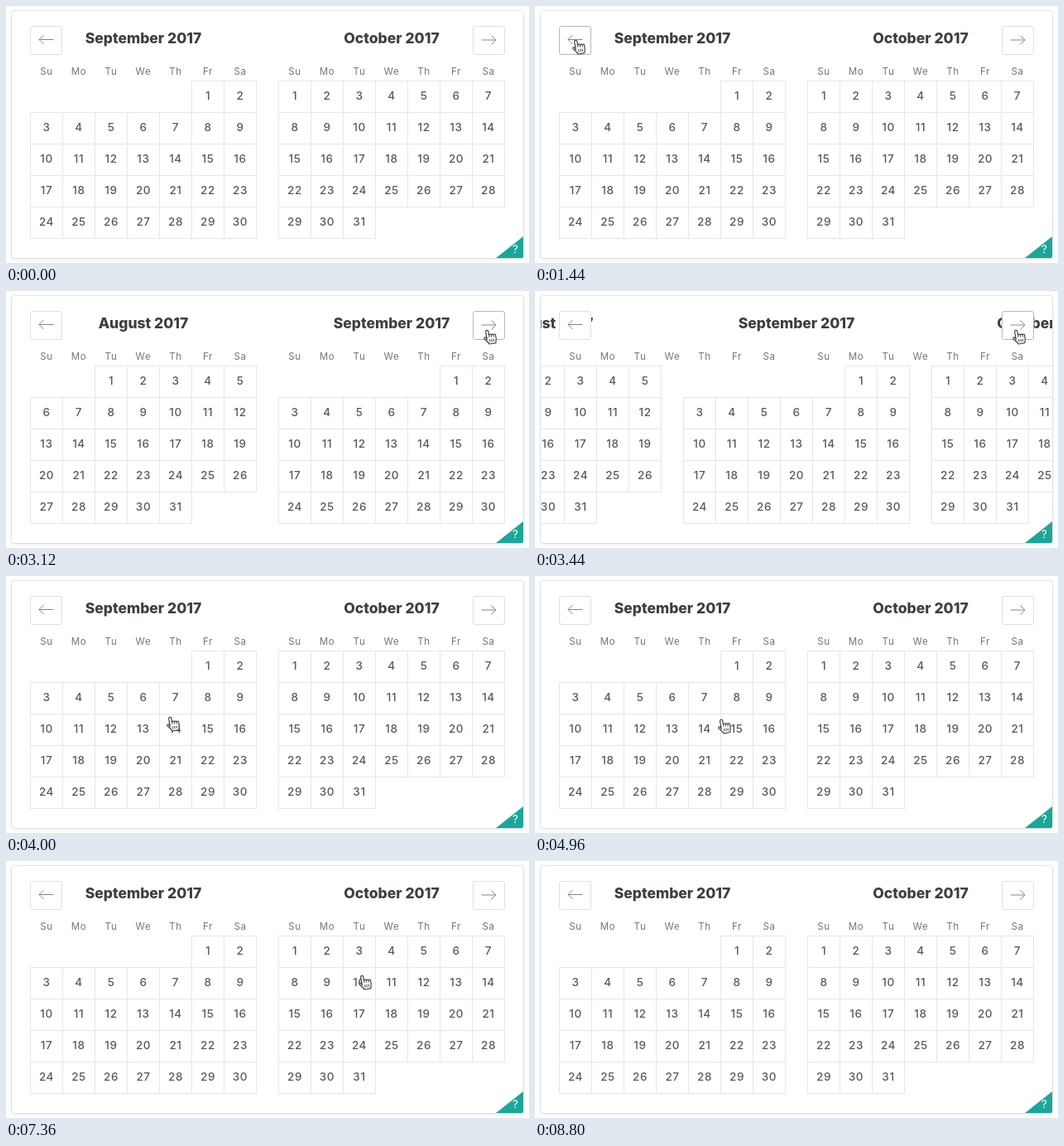
Animation, 632 px wide and 310 px high, one loop 9680 ms. Source, as an HTML page:

```html
<!DOCTYPE html>
<html lang="en">
<head>
<meta charset="utf-8">
<title>Date range picker</title>
<style>
  html, body { margin: 0; width: 100%; height: 100%; overflow: hidden; background: #fff; }
  svg { position: absolute; left: 0; top: 0; font-family: Inter, "Open Sans", sans-serif; text-anchor: middle; }
  .card { position: absolute; left: 7px; top: 6px; width: 618px; height: 298px; border-radius: 3px;
    background: #fff; box-shadow: 0 2px 6px rgba(0,0,0,.07), 0 0 0 1px rgba(0,0,0,.09); }
  .title { font-size: 17.5px; font-weight: 800; fill: #3c3f40; }
  .week { font-size: 11.5px; fill: #757575; letter-spacing: .7px; }
  .day { font-size: 13.5px; font-weight: 500; fill: #565a5c; letter-spacing: .6px; }
  .cell { fill: #fff; stroke: #e4e7e7; }
  .nav { fill: #fff; stroke: #dce0e0; }
  .nav.hover { stroke: #b8b8b8; }
  .arrow { fill: none; stroke: #82888a; }
</style>
</head>
<body>
<div class="card"></div>
<svg width="632" height="310" viewBox="0 0 632 310">
  <defs><clipPath id="inside"><rect x="7" y="6" width="618" height="298"/></clipPath></defs>
  <g clip-path="url(#inside)"><g id="months"></g></g>
  <g id="weeks"></g>
  <rect id="prev" class="nav" x="29.5" y="24.5" width="38" height="34" rx="2.5"/>
  <path class="arrow" d="M40 40.5H57.5M45.5 35L40 40.5L45.5 46"/>
  <rect id="next" class="nav" x="564.5" y="24.5" width="38" height="34" rx="2.5"/>
  <path class="arrow" d="M574.5 41H592M586.5 35.5L592 41L586.5 46.5"/>
  <path d="M592 304H623Q625 304 625 302V278Z" fill="#1aa79a"/>
  <text x="615.5" y="297.5" font-size="13.5" fill="#fff">?</text>
  <g id="cursor">
    <circle id="ring" cy="-.3" r="16.5" fill="none" stroke="#111"/>
    <g transform="translate(-.7 .3) rotate(-10)" stroke="#444" stroke-linejoin="round">
      <path fill="#fff" stroke-width="1.2"
        d="M-3.5 2.8V-6.8a1.6 1.6 0 0 1 3.2 0V-2.2a1.5 1.5 0 0 1 2.8 .3a1.4 1.4 0 0 1 2.6 .5a1.3 1.3 0 0 1 2.4 1V3.2c0 2-1.2 3-1.2 5.3H-1.8c-.6-2.6-3-4.6-4.6-6.9c-1-1.6 .8-2.6 1.9-1.4z"/>
      <path fill="none" d="M-.3-3V.5M2.5-2V.7M5.1-1V1M-.3 3V6.3M2 3V6.3M4.3 3V6.3"/>
    </g>
  </g>
</svg>
<script>
const LOOP = 9680, STEP = 80, PITCH = 300, COL = 39, ROW = 38;
const $ = id => document.getElementById(id);

function add(parent, tag, attrs, text) {
  const el = document.createElementNS('http://www.w3.org/2000/svg', tag);
  for (const k in attrs) el.setAttribute(k, attrs[k]);
  if (text !== undefined) el.textContent = text;
  parent.appendChild(el);
}

// month is zero-based; left is the x of its grid
function addMonth(name, month, left) {
  const g = $('months');
  const first = new Date(2017, month, 1).getDay();
  const count = new Date(2017, month + 1, 0).getDate();
  add(g, 'text', { class: 'title', x: left + 137, y: 45 }, name + ' 2017');
  for (let d = 1; d <= count; d++) {
    const i = first + d - 1;
    const x = left + .5 + i % 7 * COL, y = 90.5 + Math.floor(i / 7) * ROW;
    add(g, 'rect', { class: 'cell', x, y, width: COL, height: ROW });
    add(g, 'text', { class: 'day', x: x + COL / 2, y: y + 22.3 }, d);
  }
}
['August', 'September', 'October'].forEach((name, i) => addMonth(name, 7 + i, 29 + (i - 1) * PITCH));

for (const left of [29, 329])
  ['Su', 'Mo', 'Tu', 'We', 'Th', 'Fr', 'Sa'].forEach((d, i) =>
    add($('weeks'), 'text', { class: 'week', x: left + 20 + i * COL, y: 83 }, d));

// Pointer moves, each from where the last one ended
const ENTER = { at: 160, x: 321, y: 302 };
const moves = [
  { from: 160, to: 560, x: 61, y: 59.2 },
  { from: 880, to: 1440, x: 53, y: 49 },     // previous month
  { from: 2400, to: 3120, x: 585, y: 55 },   // next month
  { from: 3440, to: 4000, x: 202, y: 178 },
  { from: 4000, to: 4240, x: 209, y: 193 },  // 14 September
  { from: 4560, to: 5440, x: 255, y: 165 },
  { from: 5520, to: 5760, x: 292, y: 155 },  // 9 September
  { from: 6000, to: 6240, x: 345, y: 155 },
  { from: 6320, to: 7360, x: 434, y: 146 },
  { from: 7360, to: 7520, x: 437, y: 116 },  // 3 October
  { from: 7680, to: 8720, x: 306, y: 311 }
];
const LEAVE = moves[moves.length - 1].to;
const BACK = 1840, FORTH = 3280;
const clicks = [BACK, FORTH, 4320, 5840, 7600];

const smooth = p => p * p * (3 - 2 * p);
const ramp = (t, from, to) => smooth(Math.min(1, Math.max(0, (t - from) / (to - from))));
const slideAfter = (t, click) => ramp(t, click + 60, click + 260);

function pointer(t) {
  let { x, y } = ENTER;
  for (const m of moves) {
    const p = ramp(t, m.from, m.to);
    x += (m.x - x) * p;
    y += (m.y - y) * p;
  }
  return { x, y };
}

function show(id, on) { $(id).style.display = on ? '' : 'none'; }

function hover(id, { x, y }) {
  const b = $(id).getBBox();
  const over = x > b.x && x < b.x + b.width && y > b.y && y < b.y + b.height;
  $(id).classList.toggle('hover', over);
}

function draw(now) {
  const t = Math.floor(now % LOOP / STEP) * STEP;
  const pos = pointer(t);
  $('months').setAttribute('transform', `translate(${PITCH * (slideAfter(t, BACK) - slideAfter(t, FORTH))} 0)`);
  $('cursor').setAttribute('transform', `translate(${pos.x} ${pos.y})`);
  show('cursor', t >= ENTER.at && t <= LEAVE);
  show('ring', clicks.some(c => t >= c && t < c + 160));
  hover('prev', pos);
  hover('next', pos);
}

const start = performance.now();
function tick() {
  draw(performance.now() - start);
  requestAnimationFrame(tick);
}
tick();
</script>
</body>
</html>
```
